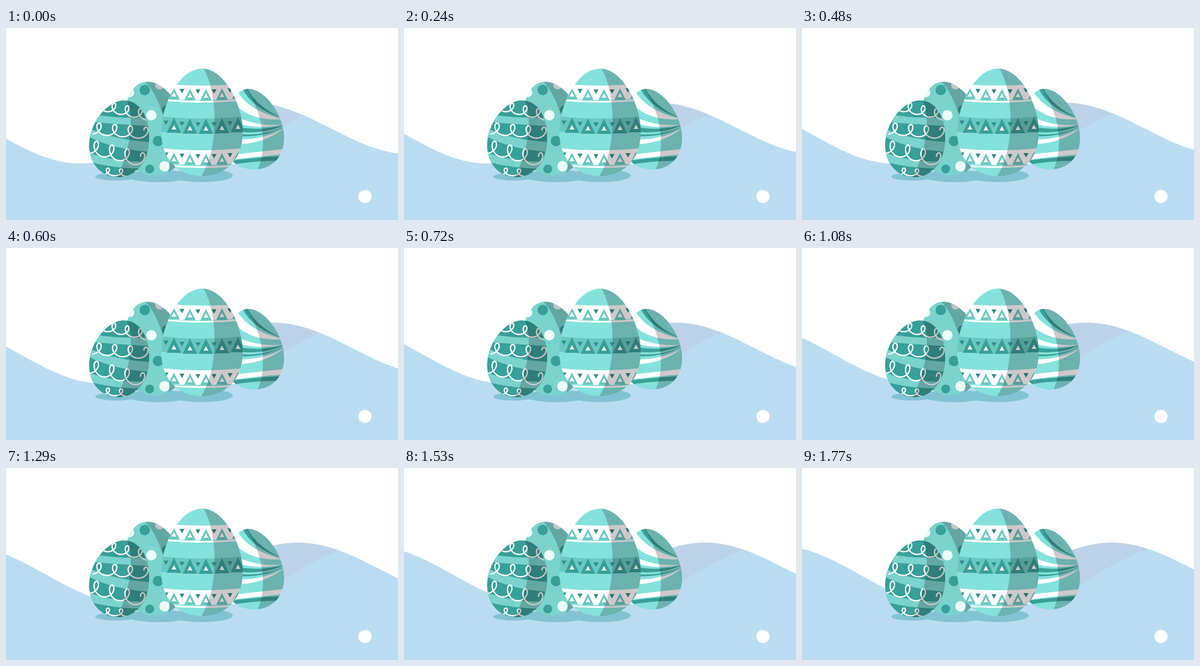
An HTML page with a canvas for the animation above (1.8 s loop, 712 px wide and 350 px high).

```html
<!DOCTYPE html>
<html lang="en">
<head>
<meta charset="utf-8">
<title>Easter eggs</title>
<style>
html, body { margin: 0; width: 100%; height: 100%; overflow: hidden; background: #fff; }
canvas { display: block; }
</style>
</head>
<body>
<canvas id="stage" width="712" height="350"></canvas>
<script>
const W = 712, H = 350, LOOP = 1800, STEP = 30;
const AQUA = '#84e1db', LIGHT = '#7ad3cc', TEAL = '#37a098', MID = '#69c8c0';
const DEEP = '#2f8f88', WHITE = '#fff', MINT = '#ecfcf9';
const SKY = '#badcf1', LILAC = '#bcd2e9', SHADOW = '#82c3d3';
const SHADE = 'rgba(20,0,5,.21)';

const stage = document.getElementById('stage').getContext('2d');
const still = document.createElement('canvas');
still.width = W;
still.height = H;
const art = still.getContext('2d');

function fill(color, d) {
  art.fillStyle = color;
  art.fill(new Path2D(d));
}

function disc(color, x, y, rx, ry = rx) {
  art.fillStyle = color;
  art.beginPath();
  art.ellipse(x, y, rx, ry, 0, 0, 7);
  art.fill();
}

function egg(outline, color, shade, pattern) {
  art.save();
  art.clip(new Path2D(outline));
  art.fillStyle = color;
  art.fillRect(0, 0, W, H);
  pattern();
  fill(SHADE, shade);
  art.restore();
}

// Right egg: stripes that taper to one point
function sweep(color, a, ca, end, cb, b) {
  fill(color, `M${a} Q${ca} ${end} Q${cb} ${b}Z`);
}

function stripes() {
  sweep(TEAL, '428,108', '448,148', '500,163', '456,145', '437,108');
  sweep(WHITE, '419,114', '440,151', '503,166', '438,172', '406,128');
  sweep(WHITE, '405,154', '450,182', '505,176', '442,188', '405,166');
  sweep(TEAL, '405,177', '460,191', '506,176', '460,199', '405,185');
  sweep(TEAL, '405,191', '462,201', '506,179', '462,204', '405,195');
  sweep(WHITE, '405,203', '465,207', '506,182', '465,215', '405,212');
  fill(WHITE, 'M400,232 Q450,227 510,220 V230 Q450,234 400,242Z');
  fill(TEAL, 'M400,243 Q450,236 510,233 V242 Q450,241 400,251Z');
}

// Back egg: dots
function dots() {
  disc(MINT, 225, 118, 8);
  disc(TEAL, 252, 113, 9.5);
  disc(MINT, 279, 104, 8);
  disc(TEAL, 291, 149, 8);
  disc(MINT, 264, 159, 9.5);
  disc(TEAL, 276, 206, 9.5);
  disc(TEAL, 261, 257, 8);
  disc(MINT, 288, 252, 9.5);
}

// Middle egg: curved rows of triangles
const bend = x => -4 * ((x - 356) / 74) ** 2;

function band(color, top, bottom) {
  const l = 282, r = 430;
  fill(color, `M${l},${top - 4} Q356,${top + 4} ${r},${top - 4}
    V${bottom - 4} Q356,${bottom + 4} ${l},${bottom - 4}Z`);
}

function tri(color, x, tip, base, half) {
  const y = bend(x);
  fill(color, `M${x},${tip + y} L${x + half},${base + y} H${x - half}Z`);
}

function row(top, height, ground, big, tip, half) {
  band(ground, top, top + height);
  for (let i = 0; i < 5; i++) {
    const x = 305 + i * 29.1;
    tri(big, x, top + tip, top + height, half);
    tri(WHITE, x, top + 14, top + 22, 4.5);
    tri(DEEP, x - 14.5, top + 15, top + 7, 4.5);
  }
}

function triangles() {
  row(105, 27, WHITE, MID, 6, 10.5);
  band(WHITE, 133, 136);
  row(165, 28, MID, TEAL, 0, 13);
  row(223, 27, WHITE, MID, 6, 10.5);
  band(WHITE, 252, 255);
}

// Left egg: bands and curls
function curls(x, y, pitch, tilt, width, height, from, to) {
  art.beginPath();
  for (let t = from; t <= to; t += 0.1) {
    const n = t / (2 * Math.PI);
    art.lineTo(x + pitch * n - width * Math.sin(t), y + tilt * n - height * Math.cos(t));
  }
  art.stroke();
}

function swirls() {
  fill(LIGHT, 'M150,156 Q205,166 264,163 V179 Q205,176 150,171Z');
  fill(LIGHT, 'M148,182 Q200,205 264,208 V226 Q195,222 148,197Z');
  fill(LIGHT, 'M148,226 Q200,246 264,243 V256 Q200,258 148,243Z');
  art.strokeStyle = WHITE;
  art.lineWidth = 2.4;
  art.lineJoin = 'round';
  curls(196, 146, 24, 5, 8.5, 9, -4, 16);
  curls(169, 184, 28.4, 2.5, 10, 10.5, -3, 20);
  curls(164, 219, 28, 7, 10, 12.5, -3, 20);
  curls(185, 262, 24, 1.5, 8, 6.5, -3, 12);
}

function drawStill() {
  disc(SHADOW, 200, 271, 38, 7);
  disc(SHADOW, 277, 270, 57, 11);
  disc(SHADOW, 356, 269, 56, 12);

  egg('M440,111 C470,111 505,158 505,201 C505,238 480,258 450,258 C420,258 395,236 395,200 C395,150 415,111 440,111Z',
    AQUA, 'M436,110 C464,150 478,215 456,260 H520 V110Z', stripes);
  egg('M257,98 C291,98 330,150 327,205 C325,245 300,269 270,269 C235,269 212,240 212,195 C212,150 222,98 257,98Z',
    LIGHT, 'M252,97 C284,126 308,225 293,270 H340 V97Z', dots);
  egg('M356,74 C397,74 430,140 430,190 C430,240 398,270 356,270 C314,270 282,240 282,190 C282,140 315,74 356,74Z',
    AQUA, 'M358,73 C385,115 388,220 354,271 H440 V73Z', triangles);
  egg('M214,132 C245,132 260,165 260,200 C260,245 235,272 204,272 C172,272 151,246 151,214 C151,172 185,132 214,132Z',
    TEAL, 'M219,131 C235,165 225,225 201,273 H270 V131Z', swirls);

  disc(WHITE, 652, 307, 12);
}

// Waves: heights at x after a number of steps
const swell = (d, half) => (1 - Math.cos(Math.PI * d / half)) / 2;
const hill = (x, n) => 136 + 94.5 * swell(x - 444.5 - 2 * n, 291);
const dip = (x, n) => 247 - 105 * swell(135 - x + 2 * n, 296);
function front(x, n) {
  const d = x - n - 501;
  return Math.max(179.5 - 0.55 * d + 0.0012 * d * d, hill(x, n));
}

function wave(color, height, from, to, n) {
  stage.fillStyle = color;
  stage.beginPath();
  stage.moveTo(from, H);
  for (let x = from; x <= to; x++) stage.lineTo(x, height(x, n));
  stage.lineTo(to, H);
  stage.fill();
}

function frame(now) {
  const n = Math.floor((now % LOOP) / STEP);
  stage.fillStyle = WHITE;
  stage.fillRect(0, 0, W, H);
  wave(SKY, dip, 0, 220, n);
  stage.fillRect(0, 248, W, H - 248);
  wave(LILAC, hill, 440, W, n);
  wave(SKY, front, 440, W, n);
  stage.drawImage(still, 0, 0);
  requestAnimationFrame(frame);
}

drawStill();
requestAnimationFrame(frame);
</script>
</body>
</html>
```
